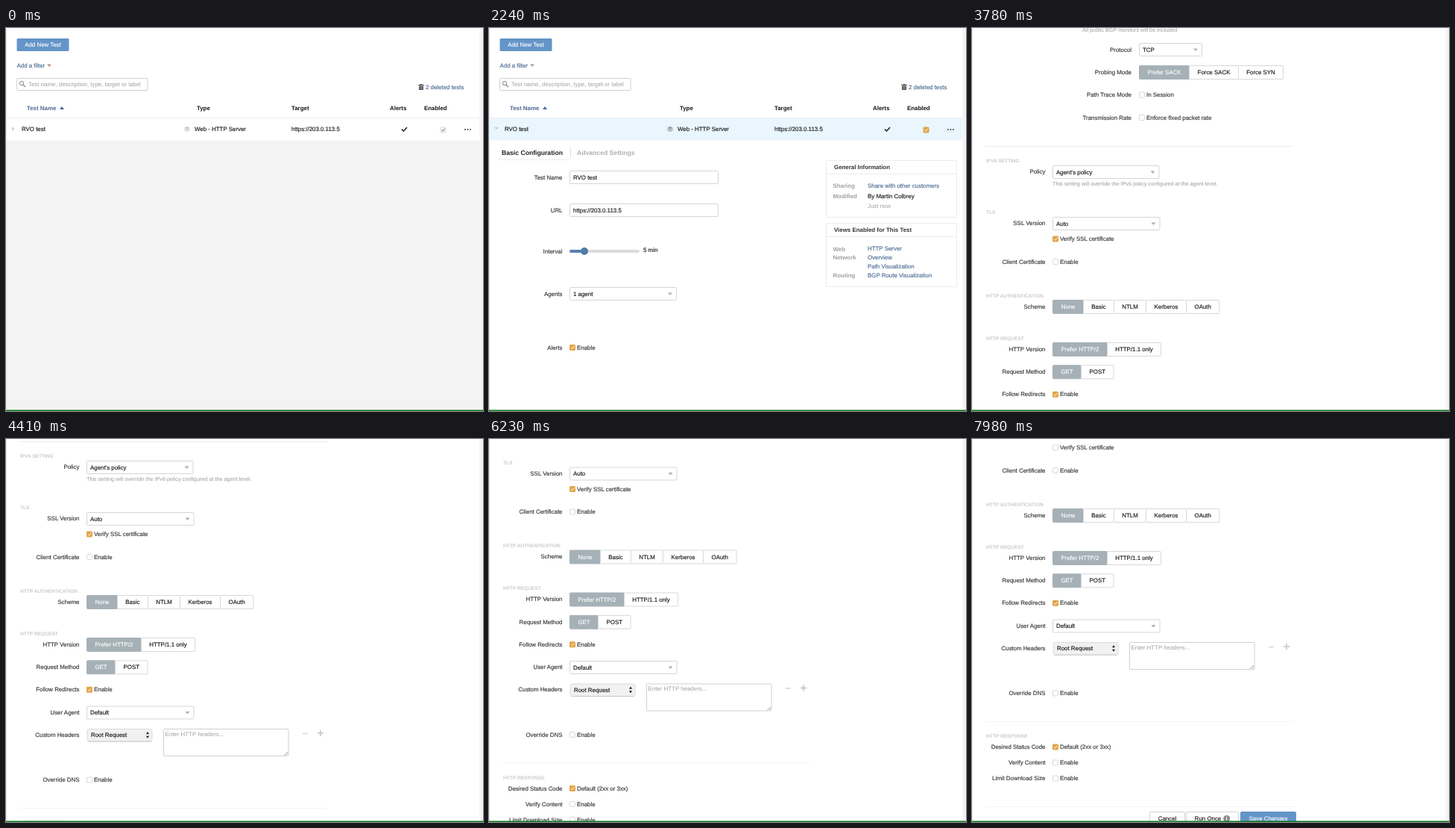
Recreate the animation shown at these times as an HTML page. Size 640 by 513 pixels, loop 8 s.

```html
<!DOCTYPE html>
<html lang="en">
<head>
<meta charset="utf-8">
<title>Test settings</title>
<style>
html, body { margin: 0; width: 100%; height: 100%; overflow: hidden; background: #f3f3f3; }
svg { display: block; width: 640px; height: 513px; }
text {
  font-family: "Liberation Sans", Arial, sans-serif; font-size: 7.9px; white-space: pre;
  text-rendering: geometricPrecision; color: #151515;
  fill: currentColor; stroke: currentColor; stroke-width: .14px;
}
.bold { font-weight: 700; stroke: none; }
.tab { font-weight: 700; font-size: 8.65px; stroke: none; }
.section { font-weight: 700; font-size: 6.6px; color: #cacaca; stroke: none; }
.note { font-size: 7.25px; color: #999; stroke: none; }
.muted { color: #a0a0a0; stroke: none; }
.link { color: #4a6a92; }
.white { color: #fff; }
.label { color: #333; }
</style>
</head>
<body>
<svg id="stage" viewBox="0 0 640 513"></svg>
<script>
const LOOP = 8000, STEP = 70;
const HOVER_ON = 1050, OPEN = 1820, HOVER_OFF = 2380, ADVANCED = 2730, UNCHECK = 7000;
const SCROLL = [
  [3360, 0], [3430, 50], [3500, 125], [3570, 125], [3780, 370], [3850, 370],
  [4200, 508], [4270, 508], [4410, 525], [4690, 640], [5040, 640], [5250, 642],
  [5530, 642], [5880, 596], [5950, 596], [6090, 585.5], [7490, 585.5],
  [7630, 625], [7700, 625], [7980, 641]
];

// Building blocks; text is placed by the middle of its capitals.
const text = (x, y, str, cls = '', anchor = 'start') =>
  `<text x="${x}" y="${y + 2.55}" class="${cls}" text-anchor="${anchor}">${str}</text>`;
const label = (y, str, x = 98.5) => text(x, y, str, 'label', 'end');
const section = (y, str) => text(19, y - .3, str, 'section');
const rect = (x, y, w, h, fill, stroke = 'none', r = 0) =>
  `<rect x="${x}" y="${y}" width="${w}" height="${h}" rx="${r}" fill="${fill}" stroke="${stroke}"/>`;
const path = (d, stroke, width = 1, fill = 'none') =>
  `<path d="${d}" fill="${fill}" stroke="${stroke}" stroke-width="${width}"/>`;
const solid = (d, fill) => path(d, 'none', 0, fill);
const rule = (x1, x2, y, color = '#f4f4f4') => path(`M${x1} ${y}H${x2}`, color);
const group = (id, body) => `<g id="${id}">${body}</g>`;

const emptyBox = (x, y) => rect(x + .5, y - 3.5, 7, 7, '#fff', '#d8d8d8', 1);
const tick = (x, y, color) => path(`M${x + 2} ${y + .2}l1.5 1.6 2.9-3.6`, color, .9);
const filledBox = (x, y) => rect(x, y - 4, 8, 8, '#e2a548', 'none', 1.5) + tick(x, y, '#fff');
const checkbox = (x, y, str, on, gap = 10) =>
  (on ? filledBox : emptyBox)(x, y) + text(x + gap, y, str, 'label');

const field = (x, y, w, h = 18) => rect(x + .5, y - 8.5, w - 1, h - 1, '#fff', '#d6d6d6', 1);
const select = (x, y, w, str) => field(x, y, w) + text(x + 5, y, str) +
  solid(`M${x + w - 12} ${y - 1.5}h6l-3 3.5z`, '#b0b0b0');
const slider = (y, knob, value) => rect(108, y - 2, 94, 4, '#dcdcdc', 'none', 2) +
  rect(108, y - 2, knob - 108, 4, '#5682ad', 'none', 2) +
  `<circle cx="${knob}" cy="${y}" r="5" fill="#4f7ca8"/>` + text(207, y - 2, value);

// A row of joined buttons with the first one selected.
const segments = (y, edges, names) => names.map((name, i) => {
  const x = edges[i], w = edges[i + 1] - x;
  return rect(x + .5, y - 9, w, 18, i ? '#fff' : '#a6b1b7', i ? '#d8d8d8' : '#a6b1b7', 1) +
    text(x + w / 2 + .5, y, name, i ? '' : 'white', 'middle');
}).join('');

const button = (x, w, str, fill = '#fff', stroke = '#d4d4d4', cls = '', shift = 0) =>
  rect(x + .5, 1140.5, w - 1, 17, fill, stroke, 1.5) +
  text(x + w / 2 - shift, 1149.3, str, cls, 'middle');

const toolbar = () =>
  rect(14.5, 14, 70, 17, '#6495c8', 'none', 1.5) + text(49.5, 22, 'Add New Test', 'white', 'middle') +
  text(14.5, 50, 'Add a filter', 'link') + `<path id="filterArrow" d="M55 48.5h6l-3 3.5z"/>` +
  rect(14.5, 67.5, 175.5, 16, '#fff', '#d0d0d0', 1) +
  `<circle cx="21" cy="74" r="2.7" fill="none" stroke="#888"/>` + path('M23 76l3 3', '#888', 1.2) +
  text(30, 75.7, 'Test name, description, type, target or label', 'muted') +
  path('M553 76.5h8M555.5 75.5h3', '#555') + rect(554, 77.5, 6, 5.5, '#555', 'none', .6) +
  path('M556 78.5v3.5M558 78.5v3.5', '#ccc', .6) +
  text(563, 79, '2 deleted tests', 'link');

const tableHead = () =>
  text(28, 107, 'Test Name', 'bold link') + solid('M72 109h6l-3-4z', '#4a6a92') +
  [[256, 'Type'], [383, 'Target'], [515, 'Alerts'], [561, 'Enabled']]
    .map(([x, name]) => text(x, 107, name, 'bold')).join('') + rule(1, 635, 120.5, '#ececec');

const tableRow = () =>
  group('rowHover', rect(1, 121, 634, 29.5, '#e9f6fd')) +
  group('chevronClosed', solid('M8 132l3.5 3-3.5 3z', '#66727a')) +
  group('chevronOpen', solid('M7 133h6l-3 3z', '#ccc')) +
  text(21, 135.8, 'RVO test') +
  group('layers', solid('M239.5 133.5l3.5-1.8 3.5 1.8v4l-3.5 1.8-3.5-1.8z', '#98a1a6') +
    path('M239.5 134.5l3.5 1.6 3.5-1.6M239.5 136.5l3.5 1.6 3.5-1.6', '#fff', .6)) +
  text(253, 135.8, 'Web - HTTP Server') + text(383, 135.8, 'https://203.0.113.5') +
  path('M531 135.6l2.4 2.4 4.6-4.8', '#333', 1.7) +
  group('enabledPlain', emptyBox(582.5, 136.5) + tick(582.5, 136.5, '#444')) +
  group('enabledColor', filledBox(582.5, 136.5)) +
  [616, 619.5, 623].map(x => `<circle cx="${x}" cy="136" r="1" fill="#444"/>`).join('');

const card = (y, h, title) => rect(452.5, y + .5, 175, h, '#fff', '#ececec', 1) +
  text(463, y + 9.3, title, 'bold label') + rule(453, 627, y + 18.5, '#ececec');
const cardRow = (y, name, value, cls = 'link') =>
  text(461.5, y + .5, name, 'bold muted') + text(508, y, value, cls);

const cards = () =>
  card(177, 76, 'General Information') +
  cardRow(211, 'Sharing', 'Share with other customers') +
  cardRow(225, 'Modified', 'By Martin Colbrey', '') + cardRow(238, '', 'Just now', 'muted') +
  card(261, 85, 'Views Enabled for This Test') +
  cardRow(295.5, 'Web', 'HTTP Server') + cardRow(307, 'Network', 'Overview') +
  cardRow(319, '', 'Path Visualization') + cardRow(331, 'Routing', 'BGP Route Visualization');

const tabs = () =>
  `<g id="tabBasic">${text(17, 167, 'Basic Configuration', 'tab')}</g>` +
  `<g id="tabAdvanced">${text(118, 167, 'Advanced Settings', 'tab')}</g>` +
  path('M109.5 160v14', '#ddd') + rule(12, 109, 176.5, '#ececec');

const basicPanel = () =>
  label(200, 'Test Name') + field(108, 200, 200) + text(113, 200, 'RVO test') +
  label(244, 'URL') + field(108, 244, 200) + text(113, 244, 'https://203.0.113.5') +
  label(299, 'Interval') + slider(299, 128, '5 min') +
  label(356, 'Agents') + select(108, 356, 144, '1 agent') +
  label(428, 'Alerts') + checkbox(108, 428, 'Enable', true);

const advancedPanel = () =>
  section(196, 'HTTP SERVER TIMING') +
  label(210, 'Timeout') + slider(210, 113, '5 s') +
  label(244, 'Target Response') + label(255, 'Time') + slider(244, 128, '1000 ms') +
  section(296.5, 'NETWORK') +
  label(311, 'Data Collection') + checkbox(108, 311, 'Perform network measurements', true) +
  checkbox(134.5, 326, 'Perform bandwidth measurements') +
  checkbox(134.5, 341.5, 'Perform MTU measurements') +
  checkbox(134.5, 356.5, 'Collect BGP data', true) +
  text(148, 372.6, 'All public BGP monitors will be included', 'note') +
  label(399, 'Protocol', 214) + select(224, 399, 85, 'TCP') +
  label(429, 'Probing Mode', 214) +
  segments(429.5, [224, 291, 357, 417], ['Prefer SACK', 'Force SACK', 'Force SYN']) +
  label(459.5, 'Path Trace Mode', 214) + checkbox(224, 459.5, 'In Session') +
  label(490, 'Transmission Rate', 214) + checkbox(224, 490, 'Enforce fixed packet rate') +
  rule(18, 432, 528.5, '#ececec') +

  section(547.5, 'IPV6 SETTING') +
  label(562.5, 'Policy') + select(108, 563, 143.5, "Agent's policy") +
  text(108, 578.3, 'This setting will override the IPv6 policy configured at the agent level.', 'note') +
  section(617, 'TLS') +
  label(631.5, 'SSL Version') + select(108, 632, 144.5, 'Auto') +
  group('verifyOn', filledBox(108, 652.5)) + group('verifyOff', emptyBox(108, 652.5)) +
  text(118, 652.5, 'Verify SSL certificate', 'label') +
  label(683, 'Client Certificate') + checkbox(108, 683, 'Enable') +
  section(728.4, 'HTTP AUTHENTICATION') +
  label(743, 'Scheme') +
  segments(743.5, [108, 149, 190, 233, 287, 331.5], ['None', 'Basic', 'NTLM', 'Kerberos', 'OAuth']) +

  section(785.4, 'HTTP REQUEST') +
  label(800.3, 'HTTP Version') + segments(800.5, [108, 181, 253], ['Prefer HTTP/2', 'HTTP/1.1 only']) +
  label(830.5, 'Request Method') + segments(830.8, [108, 146, 189.5], ['GET', 'POST']) +
  label(860.7, 'Follow Redirects') + checkbox(108, 860.7, 'Enable', true) +
  label(891, 'User Agent') + select(108, 891.5, 144.5, 'Default') +
  label(921.3, 'Custom Headers') +
  rect(109, 913.5, 87, 16.5, '#f1f1f1', '#dcdcdc', 2.5) + path('M110.5 930.2h84', '#c2c2c2', .8) +
  text(114, 921.5, 'Root Request') +
  solid('M188 920.3h4l-2-3.2zM188 922.7h4l-2 3.2z', '#222') +
  rect(211.5, 913.5, 167.5, 36, '#fff', '#d0d0d0', 1) + text(213.5, 920.3, 'Enter HTTP headers...', 'muted') +
  path('M373.5 948.5l4.5-4.5M376 948.5l2-2', '#888', .8) +
  path('M398 919.5h7', '#d8d8d8', 1.6) + path('M418 919h8M422 915v8', '#cecece', 2) +
  label(981.5, 'Override DNS') + checkbox(108, 981.5, 'Enable') +
  rule(18, 432, 1019.5) +

  section(1039.2, 'HTTP RESPONSE') +
  label(1053.5, 'Desired Status Code') + checkbox(108, 1053.5, 'Default (2xx or 3xx)', true) +
  label(1074.5, 'Verify Content') + checkbox(108, 1074.5, 'Enable') +
  label(1095.5, 'Limit Download Size') + checkbox(108, 1095.5, 'Enable') +
  rule(18, 435, 1133.5) +
  group('buttonsIdle', button(251, 47, 'Cancel') + button(300, 58, 'Run Once') +
    button(360, 75, 'Save Changes', '#a0bcdf', '#a0bcdf', 'white')) +
  group('buttonsReady', button(238, 48, 'Cancel') + button(287, 71, 'Run Once', '#fff', '#d4d4d4', '', 6) +
    '<circle cx="341.7" cy="1149.5" r="4.5" fill="#8a8a8a"/>' + text(341.7, 1149.5, 'i', 'bold white', 'middle') +
    button(360, 75, 'Save Changes', '#6495c8', '#6495c8', 'white'));

const stage = document.getElementById('stage');
stage.innerHTML =
  `<rect id="sheet" x="0" y="0" width="635.5" height="513" fill="#fff"/>` +
  group('page', toolbar() + tableHead() + tableRow() +
    group('details', tabs() + cards() + group('basic', basicPanel()) + group('advanced', advancedPanel()))) +
  rect(0, 0, .8, 513, '#e4e4e4') + rect(0, 511.5, 640, 1.5, '#0c7a1c');

const byId = id => document.getElementById(id);
const show = (id, visible) => byId(id).setAttribute('display', visible ? 'inline' : 'none');

function scrollAt(t) {
  const i = SCROLL.findIndex(([time]) => time > t);
  if (i === 0) return 0;
  if (i < 0) return SCROLL[SCROLL.length - 1][1];
  const [t0, y0] = SCROLL[i - 1], [t1, y1] = SCROLL[i];
  return y0 + (y1 - y0) * (t - t0) / (t1 - t0);
}

function render(now) {
  const t = Math.floor(now % LOOP / STEP) * STEP;
  const hover = t >= HOVER_ON && t < HOVER_OFF, open = t >= OPEN;
  const advanced = t >= ADVANCED, edited = t >= UNCHECK;

  byId('sheet').setAttribute('height', open ? 513 : 150.5);
  byId('page').setAttribute('transform', `translate(0 ${-scrollAt(t)})`);
  byId('filterArrow').setAttribute('fill', t < HOVER_ON ? '#b9947f' : '#a0a0a0');
  byId('layers').setAttribute('opacity', hover ? 1 : .5);
  byId('chevronClosed').setAttribute('opacity', hover ? 1 : .35);
  byId('tabBasic').firstChild.style.color = advanced ? '#b0b0b0' : '#222';
  byId('tabAdvanced').firstChild.style.color = advanced ? '#222' : '#b0b0b0';
  show('rowHover', hover);
  show('chevronClosed', !open);
  show('chevronOpen', open);
  show('enabledPlain', t < HOVER_ON);
  show('enabledColor', t >= HOVER_ON);
  show('details', open);
  show('basic', !advanced);
  show('advanced', advanced);
  show('verifyOn', !edited);
  show('verifyOff', edited);
  show('buttonsIdle', !edited);
  show('buttonsReady', edited);
}

const start = performance.now();
function frame() {
  render(performance.now() - start);
  requestAnimationFrame(frame);
}
frame();
</script>
</body>
</html>
```
